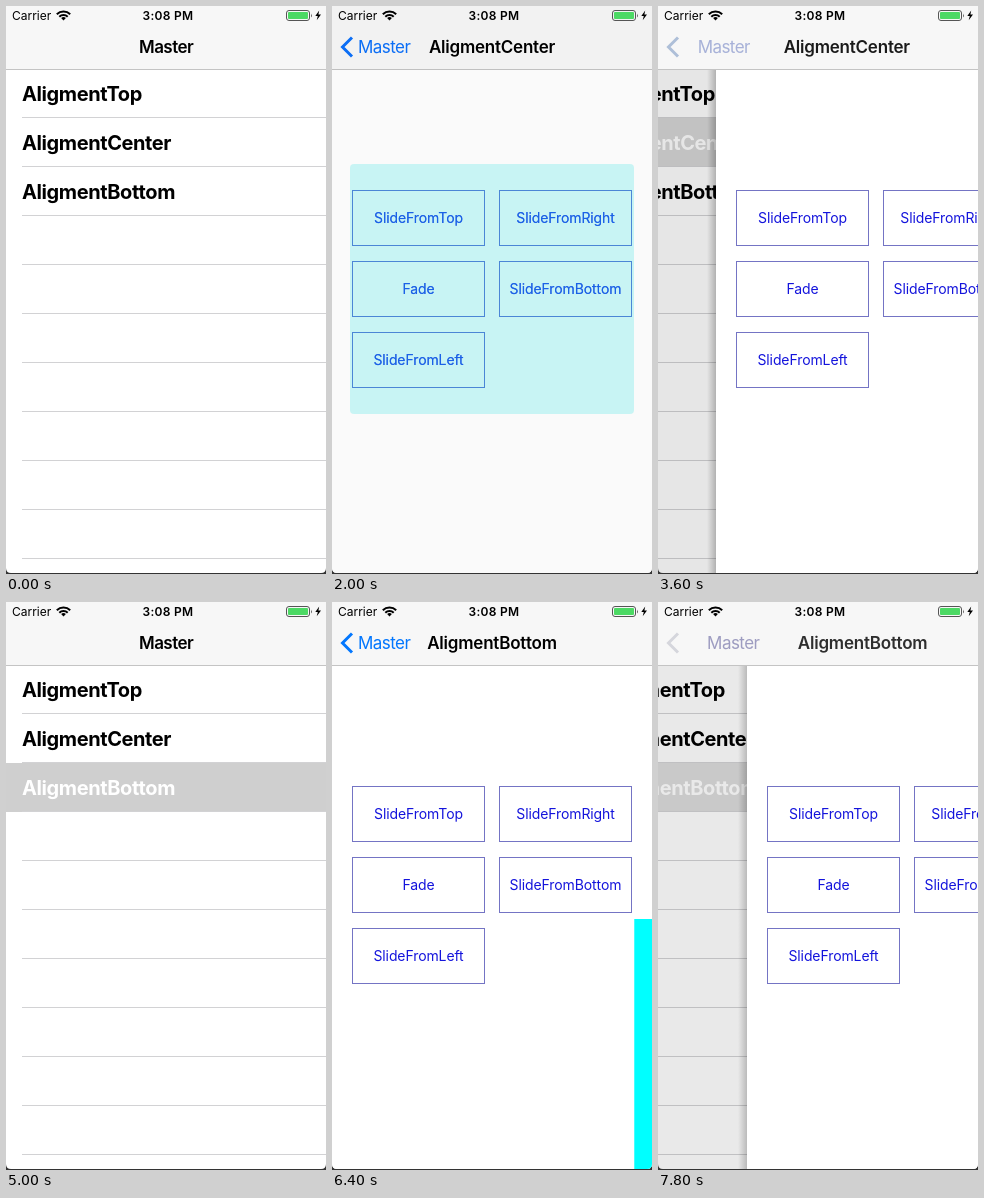
Animation of 320 by 568 pixels, one loop 8 s. Source, as an HTML page:

```html
<!DOCTYPE html>
<html lang="en">
<head>
<meta charset="utf-8">
<title>Popup alignment demo</title>
<style>
  html, body { margin: 0; width: 100%; height: 100%; overflow: hidden; background: #333; }
  svg { display: block; width: 100vw; height: 100vh; font-family: Inter, Roboto, sans-serif; }
  .nav { font-size: 17px; letter-spacing: -.55px; }
  .title { font-weight: 600; letter-spacing: -.22px; text-anchor: middle; }
  .cell { font-size: 20px; font-weight: 700; letter-spacing: -.4px; }
  .btn { font-size: 14px; letter-spacing: -.1px; text-anchor: middle; }
  .status { font-size: 12px; }
</style>
</head>
<body>
<svg viewBox="0 0 320 568">
  <defs>
    <clipPath id="screen"><path d="M0 0H320V562Q320 567 315 567H5Q0 567 0 562Z"/></clipPath>
    <linearGradient id="edge">
      <stop offset="0" stop-color="#000" stop-opacity="0"/>
      <stop offset="1" stop-color="#000" stop-opacity=".28"/>
    </linearGradient>
  </defs>
  <rect width="320" height="568" fill="#333"/>
  <g clip-path="url(#screen)">
    <rect width="320" height="568" fill="#fff"/>
    <g id="list"></g>
    <rect id="shade" y="64" width="320" height="504"/>
    <g id="detail">
      <rect id="shadow" x="-9" y="64" width="9" height="504" fill="url(#edge)"/>
      <rect y="64" width="320" height="504" fill="#fff"/>
      <g id="buttons" fill="#1414dc" stroke="#7474c4"></g>
    </g>
    <rect width="320" height="63" fill="#f7f7f7"/>
    <rect y="63" width="320" height="1" fill="#c4c4c4"/>
    <g class="nav">
      <path id="chevron" d="M20 31.5L10.5 41L20 50.5" fill="none" stroke-width="3"/>
      <text id="back" y="47">Master</text>
      <text id="master" y="47">Master</text>
      <text id="title" class="title" y="47"></text>
    </g>
    <rect id="dim" width="320" height="568"/>
    <rect id="popup"/>
    <g id="ghost" fill="#2078f0" stroke="#2f86f4" stroke-opacity=".55"></g>
    <g class="status">
      <text x="6" y="13.5">Carrier</text>
      <g fill="none" stroke="#000" stroke-width="2">
        <path d="M50.8 8.2A9.6 9.6 0 0 1 64.2 8.2M53.3 10.7A6 6 0 0 1 61.7 10.7"/>
      </g>
      <path d="M57.5 14.5L55.1 12.1A3.4 3.4 0 0 1 59.9 12.1Z"/>
      <text x="162" y="13.5" font-weight="600" letter-spacing=".3" text-anchor="middle">3:08 PM</text>
      <rect x="280.5" y="4.5" width="23" height="10" rx="2.5" fill="none" stroke="#555"/>
      <rect x="282" y="6" width="20" height="7" rx="1" fill="#4cd964"/>
      <path d="M305 7.5Q306.6 9.5 305 11.5Z" fill="#555"/>
      <path d="M313.2 4.5L309.3 10H311.8L310.7 14.2L315 8.4H312.4Z"/>
    </g>
  </g>
</svg>
<script>
const LOOP = 8000, STEP = 200;
const $ = id => document.getElementById(id);
const set = (el, attrs) => { for (const k in attrs) el.setAttribute(k, attrs[k]); };
const mix = (a, b, k) => `rgb(${a.map((v, i) => Math.round(v + (b[i] - v) * k))})`;

const rows = ['AligmentTop', 'AligmentCenter', 'AligmentBottom'];
const effects = ['SlideFromTop', 'SlideFromRight', 'Fade', 'SlideFromBottom', 'SlideFromLeft'];

const visits = [
  { row: 1, tap: 200, push: 365, pop: 3552, x: 18, y: 158, w: 284, h: 250, r: 4,
    popups: [{ from: 'top', open: 1100, close: 1500 }, { from: 'fade', open: 1900, close: 2673 }] },
  { row: 2, tap: 5000, push: 5130, pop: 7735, x: 0, y: 317, w: 320, h: 251, r: 0,
    popups: [{ from: 'right', open: 5700, close: 6100 }, { from: 'bottom', open: 6500, close: 7100 }] }
];

$('list').innerHTML =
  '<rect id="pick" width="320" height="49" fill="#cfcfcf"/>' +
  Array.from({ length: 10 }, (_, i) =>
    `<rect x="16" y="${111 + 49 * i}" width="304" height="1" fill="#d2d2d4"/>`).join('') +
  rows.map((s, i) => `<text class="cell" x="16" y="${95 + 49 * i}">${s}</text>`).join('');
const cells = document.querySelectorAll('.cell');

const buttonMarkup = effects.map((s, i) => {
  const x = 20 + 147 * (i % 2), y = 184 + 71 * Math.floor(i / 2);
  return `<rect x="${x + .5}" y="${y + .5}" width="132" height="55" fill="none"/>` +
    `<text class="btn" x="${x + 66.5}" y="${y + 33}" stroke="none">${s}</text>`;
}).join('');
$('buttons').innerHTML = $('ghost').innerHTML = buttonMarkup;

// Critically damped spring, as in a navigation transition
function spring(ms) {
  const u = .016 * ms;
  return u <= 0 ? 0 : u > 7.3 ? 1 : 1 - (1 + u) * Math.exp(-u);
}

function ease(ms) {
  const k = Math.min(1, Math.max(0, ms / 350));
  return k * k * (3 - 2 * k);
}

// q: 0 = detail on screen, 1 = list on screen
function drawNavigation(t, v, q, shown) {
  const popping = t >= v.pop;
  const selected = t < v.tap ? 0 : popping ? 1 - q : 1;
  set($('list'), { transform: `translate(${Math.round(-96 * (1 - q))} 0)` });
  set($('pick'), { y: 63 + 49 * v.row, opacity: selected });
  cells.forEach((c, i) => set(c, { fill: i === v.row && selected > .1 ? '#fff' : '#000' }));
  set($('shade'), { opacity: .12 * (1 - q) });
  set($('detail'), { transform: `translate(${Math.round(320 * q)} 0)` });
  set($('shadow'), { opacity: 1 - q });

  const pressed = t >= v.pop - 200 && !popping ? .3 : 1;
  const tint = mix([0, 122, 255], [62, 72, 232], shown);
  const left = 26 + 107 * q ** 1.2;
  set($('chevron'), {
    stroke: q ? mix([0, 122, 255], [80, 80, 110], Math.min(1, q * 3.5)) : tint,
    opacity: pressed * (1 - q) ** 5
  });
  set($('back'), { x: left, fill: tint, opacity: pressed * (1 - q) ** 10 });
  set($('master'), {
    x: left, fill: mix([42, 26, 144], [0, 0, 0], q),
    opacity: Math.min(1, q * 1.35), 'font-weight': q > .6 ? 600 : 400
  });
  $('title').textContent = rows[v.row];
  set($('title'), { x: 160 + 160 * q, opacity: 1 - q ** 1.3 });
}

function drawPopup(v, popup, shown) {
  const from = popup ? popup.from : 'fade';
  const fade = from === 'fade';
  const hidden = 1 - shown;
  const between = fade ? 4 * shown * hidden : 0;
  const [dx, dy] = {
    top: [0, -v.y - v.h], right: [320 - v.x, 0], bottom: [0, 568 - v.y], fade: [0, 0]
  }[from];
  const level = Math.round(255 - 56 * between);
  set($('dim'), { opacity: .5 * shown * shown });
  set($('popup'), {
    x: v.x + dx * hidden, y: v.y + dy * hidden, width: v.w, height: v.h, rx: v.r,
    fill: `rgb(0,${level},${level})`, opacity: fade ? shown : +(shown > 0)
  });
  set($('ghost'), { opacity: between });
}

function draw(t) {
  const v = visits[t < visits[1].tap ? 0 : 1];
  const popup = v.popups.filter(p => t >= p.open).pop();
  const shown = popup ? ease(t - popup.open) - ease(t - popup.close) : 0;
  drawNavigation(t, v, 1 - spring(t - v.push) + spring(t - v.pop), shown);
  drawPopup(v, popup, shown);
}

const start = performance.now();
function tick() {
  const t = (performance.now() - start) % LOOP;
  draw(Math.floor(t / STEP) * STEP);
  requestAnimationFrame(tick);
}
tick();
</script>
</body>
</html>
```
